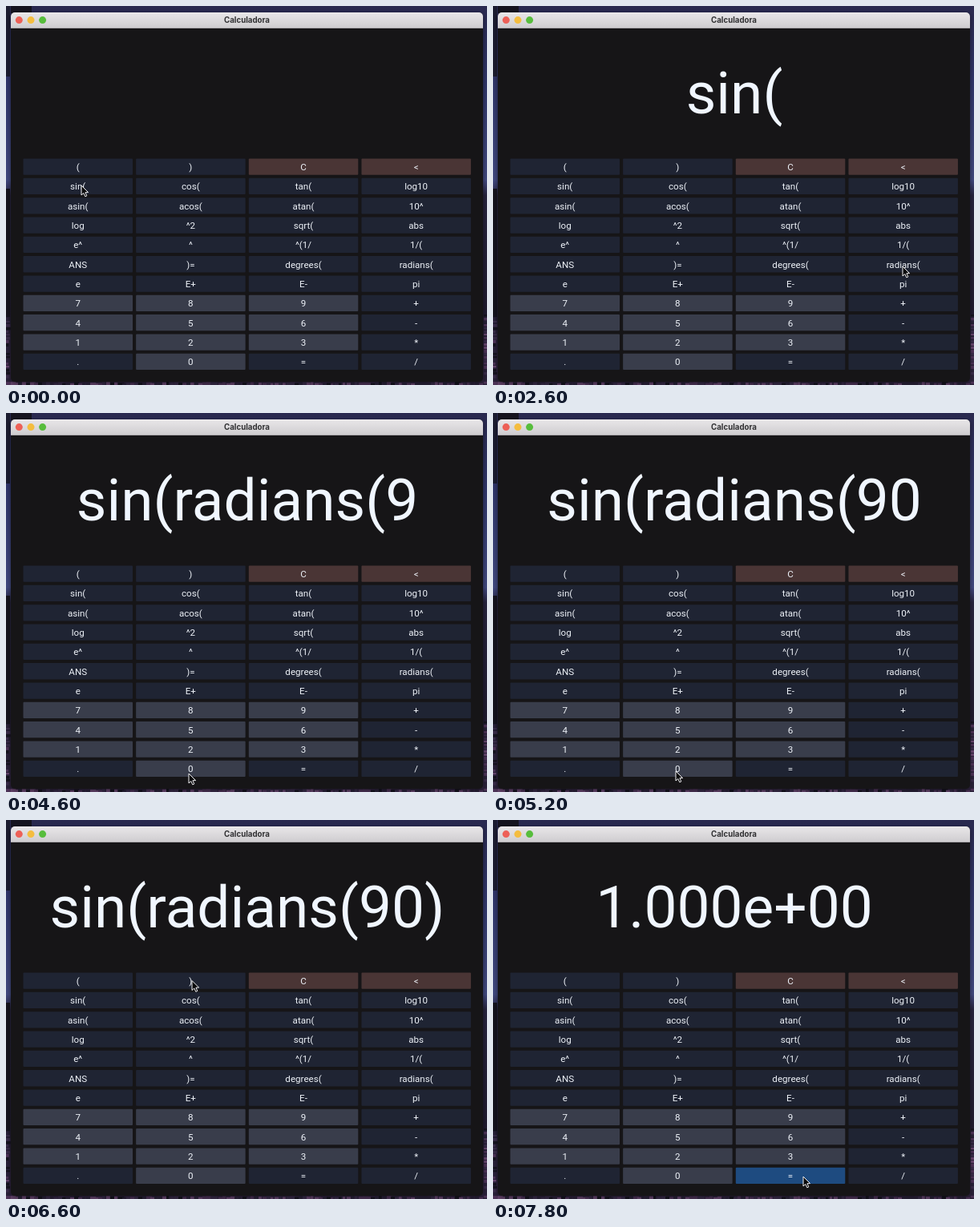
An HTML page with a canvas for the animation above (8 s loop, 600x473 px).

```html
<!DOCTYPE html>
<html lang="es">
<head>
<meta charset="utf-8">
<title>Calculadora</title>
<style>
html, body { margin: 0; width: 100%; height: 100%; overflow: hidden; background: #161517; }
canvas { display: block; width: 600px; height: 473px; }
</style>
</head>
<body>
<canvas id="stage" width="600" height="473"></canvas>
<script>
const ctx = document.getElementById('stage').getContext('2d');
const LOOP = 8000, STEP = 200;

const ROWS = [
  ['(', ')', 'C', '<'],
  ['sin(', 'cos(', 'tan(', 'log10'],
  ['asin(', 'acos(', 'atan(', '10^'],
  ['log', '^2', 'sqrt(', 'abs'],
  ['e^', '^', '^(1/', '1/('],
  ['ANS', ')=', 'degrees(', 'radians('],
  ['e', 'E+', 'E-', 'pi'],
  ['7', '8', '9', '+'],
  ['4', '5', '6', '-'],
  ['1', '2', '3', '*'],
  ['.', '0', '=', '/']
];

// Each press lights its key for one step and changes the display.
const PRESSES = [
  { t: 600, key: 'sin(', text: 'sin(' },
  { t: 2800, key: 'radians(', text: 'sin(radians(' },
  { t: 3600, key: '9', text: 'sin(radians(9' },
  { t: 5000, key: '0', text: 'sin(radians(90' },
  { t: 6400, key: ')', text: 'sin(radians(90)' },
  { t: 6800, key: ')', text: 'sin(radians(90))' },
  { t: 7600, key: '=', text: '1.000e+00' }
];

// Pointer stops: time, x, y
const PATH = [
  [0, 94, 224], [1000, 94, 224], [2400, 511, 326], [2600, 511, 325],
  [2800, 511, 322], [3400, 371, 373], [3800, 371, 373], [4600, 228, 450],
  [5000, 228, 447], [5400, 228, 447], [6200, 231, 205], [6400, 232, 201],
  [6800, 232, 200], [7600, 387, 445], [8000, 387, 445]
];

function pointerAt(t) {
  const i = Math.max(1, PATH.findIndex(p => p[0] >= t));
  const [t0, x0, y0] = PATH[i - 1], [t1, x1, y1] = PATH[i];
  const u = (t - t0) / (t1 - t0), k = u * u * (3 - 2 * u);
  return [x0 + (x1 - x0) * k, y0 + (y1 - y0) * k];
}

function rect(x, y, w, h, fill) {
  ctx.fillStyle = fill;
  ctx.fillRect(x, y, w, h);
}

function round(x, y, w, h, r, fill) {
  ctx.fillStyle = fill;
  ctx.beginPath();
  ctx.roundRect(x, y, w, h, r);
  ctx.fill();
}

function vertical(y0, y1, stops) {
  const g = ctx.createLinearGradient(0, y0, 0, y1);
  stops.forEach(([at, color]) => g.addColorStop(at, color));
  return g;
}

function label(text, x, y, font, color) {
  ctx.font = font;
  ctx.fillStyle = color;
  ctx.fillText(text, x, y);
}

function drawDesktop() {
  let seed = 11;
  const rnd = () => (seed = seed * 16807 % 2147483647) / 2147483647;
  rect(0, 0, 600, 473, vertical(0, 473, [
    [0, '#29294f'], [0.2, '#30366b'], [0.46, '#414980'],
    [0.5, '#27243f'], [0.8, '#201b30'], [1, '#302440']
  ]));
  rect(6, 0, 26, 9, '#15141f');
  rect(0, 0, 5, 88, '#1b1c30');
  rect(0, 228, 5, 160, '#14131d');
  const tones = ['#15131f', '#4d3358', '#67466f', '#292139', '#392c4a'];
  const tone = () => tones[Math.floor(rnd() * tones.length)];
  for (let x = 0; x < 600; x += 5) rect(x, 469 + rnd() * 2, 3 + rnd() * 5, 4, tone());
  for (let y = 385; y < 470; y += 4) {
    rect(0, y, 3 + rnd() * 3, 2 + rnd() * 2, tone());
    rect(596, y, 4, 2 + rnd() * 2, tone());
  }
}

function drawWindow() {
  ctx.save();
  ctx.shadowColor = 'rgba(0,0,0,0.5)';
  ctx.shadowBlur = 6;
  ctx.shadowOffsetY = 2;
  round(6, 8, 589, 461, 5, '#161517');
  ctx.restore();
  round(6, 8, 589, 20, [5, 5, 0, 0], vertical(8, 28, [[0, '#e9e7e9'], [1, '#cecccf']]));
  rect(6, 27, 589, 1, '#aaa8ab');
  [[16.3, '#ed6057'], [31, '#f4bd3f'], [45.6, '#57bd3c']].forEach(([x, color]) => {
    ctx.fillStyle = color;
    ctx.beginPath();
    ctx.arc(x, 17.6, 4.5, 0, Math.PI * 2);
    ctx.fill();
  });
  label('Calculadora', 300.5, 20.8, '700 9.7px Inter, sans-serif', '#303032');
}

function keyColor(key, pressed) {
  if (key === pressed) return '#1e4b80';
  if (key === 'C' || key === '<') return '#4a3535';
  return /^\d$/.test(key) ? '#393d4b' : '#1f2433';
}

function drawKeys(pressed) {
  ROWS.forEach((row, r) => row.forEach((key, c) => {
    const x = 21.5 + c * 140.65, y = 190.5 + r * 24.32;
    round(x, y, 136.5, 20.3, 1, keyColor(key, pressed));
    label(key, x + 68.2, y + 14.5, '11.6px Roboto, sans-serif', '#eef2f8');
  }));
}

function drawPointer(x, y) {
  const shape = [[0, 0], [0, 12], [2.8, 9.5], [4.8, 13.8], [6.8, 12.9], [4.9, 8.7], [8.6, 8.6]];
  ctx.save();
  ctx.translate(x, y);
  ctx.beginPath();
  shape.forEach(([px, py]) => ctx.lineTo(px, py));
  ctx.closePath();
  ctx.fillStyle = '#08080a';
  ctx.fill();
  ctx.strokeStyle = '#f2f2f4';
  ctx.lineWidth = 1;
  ctx.lineJoin = 'round';
  ctx.stroke();
  ctx.restore();
}

function draw(t) {
  const last = PRESSES.filter(p => p.t <= t).pop();
  const pressed = last && (t - last.t < STEP || last.key === '=') ? last.key : null;
  ctx.textAlign = 'center';
  ctx.textBaseline = 'alphabetic';
  drawDesktop();
  drawWindow();
  if (last) label(last.text, 301, 134, '73px Roboto, sans-serif', '#f0f6ff');
  drawKeys(pressed);
  drawPointer(...pointerAt(t));
}

const start = performance.now();
function tick() {
  const t = (performance.now() - start) % LOOP;
  draw(Math.floor(t / STEP) * STEP);
  requestAnimationFrame(tick);
}
tick();
</script>
</body>
</html>
```
